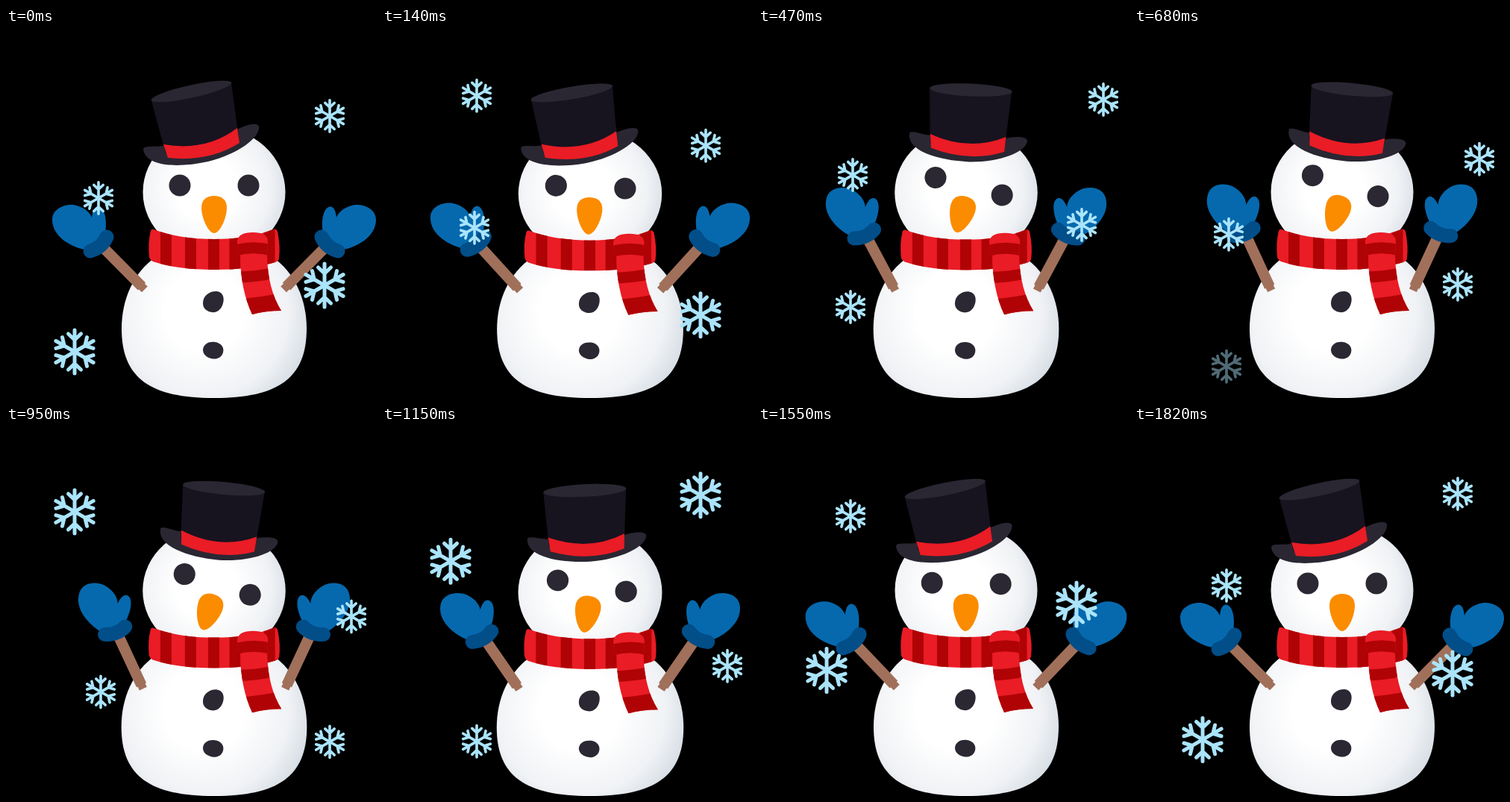
Recreate the animation shown at these times as an HTML page. Size 496 by 496 pixels, loop 1.88 s.

```html
<!DOCTYPE html>
<html lang="en">
<head>
<meta charset="utf-8">
<title>Snowman</title>
<style>
  html, body { margin: 0; width: 100%; height: 100%; overflow: hidden; background: #000; }
  svg { display: block; width: 100vw; height: 100vh; }
</style>
</head>
<body>
<svg viewBox="0 0 496 496">
  <defs>
    <radialGradient id="bodySnow" gradientUnits="userSpaceOnUse" cx="265" cy="380" r="152">
      <stop offset=".35" stop-color="#fff"/>
      <stop offset=".75" stop-color="#f0f2f5"/>
      <stop offset="1" stop-color="#d3dbe2"/>
    </radialGradient>
    <radialGradient id="headSnow" gradientUnits="userSpaceOnUse" cx="268" cy="215" r="116">
      <stop offset=".35" stop-color="#fff"/>
      <stop offset=".75" stop-color="#f0f2f5"/>
      <stop offset="1" stop-color="#d6dde4"/>
    </radialGradient>
    <clipPath id="bandClip">
      <path id="bandShape" d="M198 270Q232 283 279 283Q326 283 358 270Q362 268 364 273Q368 292 366 309Q365 313 361 314Q328 324 279 324Q230 324 197 313Q193 311 192 307Q190 288 194 272Q195 269 198 270Z"/>
    </clipPath>
    <clipPath id="tailClip">
      <path id="tailShape" d="M310 285Q312 274 331 274Q350 274 351 285L350 306Q351 350 369 379Q348 379 330 384Q314 350 314 304Q309 296 310 285Z"/>
    </clipPath>
    <g id="arm">
      <path d="M130 294L182 346.500" stroke="#a1705a" stroke-width="14.500"/>
      <path d="M178 342.500L182 346.500" stroke="#a1705a" stroke-width="11" stroke-linecap="square"/>
      <path fill="#0669ae" d="M110 298C90 295 62 281 62 257C62 243 77 236 90 237C103 239 112 246 115 254C116 246 118 239 124 239.500C132 241 136 256 133 276Z"/>
      <path fill="none" d="M113 299Q129 294 135 280" stroke="#014e89" stroke-width="19" stroke-linecap="round"/>
    </g>
    <g id="flake" fill="none" stroke="#aae4fb" stroke-width="5" stroke-linecap="round"></g>
  </defs>
  <rect width="496" height="496" fill="#000"/>
  <g id="snowman">
    <path fill="url(#bodySnow)" d="M202 306C170 328 155 365 155 403C155 470 194 496 279 496C364 496 403 470 403 403C403 365 388 328 356 306Z"/>
    <ellipse cx="279" cy="220" rx="95.500" ry="87" fill="url(#headSnow)"/>
    <g fill="#2b2833">
      <path d="M264 369C264 358 274 352 283 353C291 354 293 362 291 369C289 377 283 382 276 381C269 380 264 376 264 369Z"/>
      <path d="M264 431C265 423 273 420 280 421C288 422 293 428 291 435C289 442 282 445 275 443C268 441 264 437 264 431Z"/>
    </g>
    <use href="#bandShape" fill="#ea1c25"/>
    <path clip-path="url(#bandClip)" stroke="#b00306" stroke-width="15" d="M214.500 265V330M247.500 265V330M278.500 265V330M307 265V330M353 265V330"/>
    <use href="#tailShape" fill="#ea1c25"/>
    <g clip-path="url(#tailClip)" fill="none" stroke="#b00306">
      <path stroke-width="15" d="M305 299Q330 291 356 298M305 334Q335 334 360 328"/>
      <path stroke-width="24" d="M315 375Q345 373 375 366"/>
    </g>
    <g id="head">
      <g fill="#2b2833">
        <circle cx="233" cy="211" r="14.500"/>
        <circle cx="325" cy="211" r="14.500"/>
      </g>
      <path fill="#fb8c00" d="M262 241C262 230 269 225 279 225C289 225 296 230 296 241C296 254 287 275 279 275C271 275 262 254 262 241Z"/>
      <path fill="#2a2733" d="M184 162C186 157 200 160 210 158L310 136C319 131 337 125 339 132C341 147 311 169 271 179C230 188 186 186 184 162Z"/>
      <path fill="#17131f" d="M194.500 96L214 168Q266 172 312 148L302 73Z"/>
      <path fill="#ea1c25" d="M211 156Q268 166 310 134L313 154Q272 180 217 174Z"/>
      <ellipse cx="248.500" cy="85" rx="55" ry="8.500" fill="#2a2733" transform="rotate(-12.300 248.500 85)"/>
    </g>
    <use id="leftArm" href="#arm"/>
    <g transform="matrix(-1 0 0 1 558 0)"><use id="rightArm" href="#arm"/></g>
  </g>
  <g id="flakes"></g>
</svg>
<script>
const LOOP = 1880, STEP = 67.5, STEPS = 28, TICKS = 47;
const FALL = 13.28;
const BIG = 1, SMALL = 0.73;
// x, height at tick 0, size
const FLAKES = [
  [434, 118, SMALL], [434, -520, SMALL],
  [124, 228, SMALL], [124, -397, SMALL],
  [427, 345, BIG], [427, -279, BIG],
  [92, 434, BIG], [92, -190.5, BIG],
  [127, 51, SMALL], [463, -50, SMALL]
];

const byId = id => document.getElementById(id);
const clamp = v => Math.min(1, Math.max(0, v));

function addNode(parent, tag, attrs) {
  const node = document.createElementNS("http://www.w3.org/2000/svg", tag);
  for (const name in attrs) node.setAttribute(name, attrs[name]);
  return parent.appendChild(node);
}

for (let a = 0; a < 360; a += 60) {
  addNode(byId("flake"), "path", {
    d: "M0 0V-29M-8.5 -24L0 -16L8.5 -24",
    transform: `rotate(${a})`
  });
}
const flakeNodes = FLAKES.map(() => addNode(byId("flakes"), "use", { href: "#flake" }));

// Cubic curve (.2, 0, .2, 1), solved for x by bisection
function ease(x) {
  x = clamp(x);
  let lo = 0, hi = 1;
  for (let n = 0; n < 24; n++) {
    const t = (lo + hi) / 2;
    if (0.6 * t * (1 - t) + t ** 3 < x) lo = t; else hi = t;
  }
  return 3 * lo * lo - 2 * lo ** 3;
}

function draw(tick) {
  const sway = tick < 21.5 ? ease((tick - 0.5) / 21) : 1 - ease((tick - 21.5) / 24.5);
  const squash = Math.sin(Math.PI * clamp((tick < 22 ? tick : tick - 22) / 12));
  const set = (id, value) => byId(id).setAttribute("transform", value);

  set("snowman", `translate(279 495) scale(${1 + 0.01 * squash} ${1 - 0.011 * squash}) translate(-279 -495)`);
  set("head", `rotate(${18.2 * sway} 279 225)`);
  set("leftArm", `rotate(${20.5 * sway} 181 346)`);
  set("rightArm", `rotate(${20.5 * sway} 181 346)`);

  FLAKES.forEach(([x, start, size], n) => {
    const y = start + FALL * tick;
    flakeNodes[n].setAttribute("transform", `translate(${x} ${y}) scale(${size})`);
    flakeNodes[n].setAttribute("opacity", clamp((y - 51.5) / 28) * clamp((466 - y) / 26));
  });
}

const begin = performance.now();
function play() {
  const ms = Math.max(0, performance.now() - begin) % LOOP;
  const step = Math.min(STEPS - 1, Math.floor((Math.floor(ms / 10) * 10 + 4.9) / STEP));
  draw(Math.floor(step * (TICKS - 1) / (STEPS - 1) + 1e-6));
  requestAnimationFrame(play);
}
play();
</script>
</body>
</html>
```
